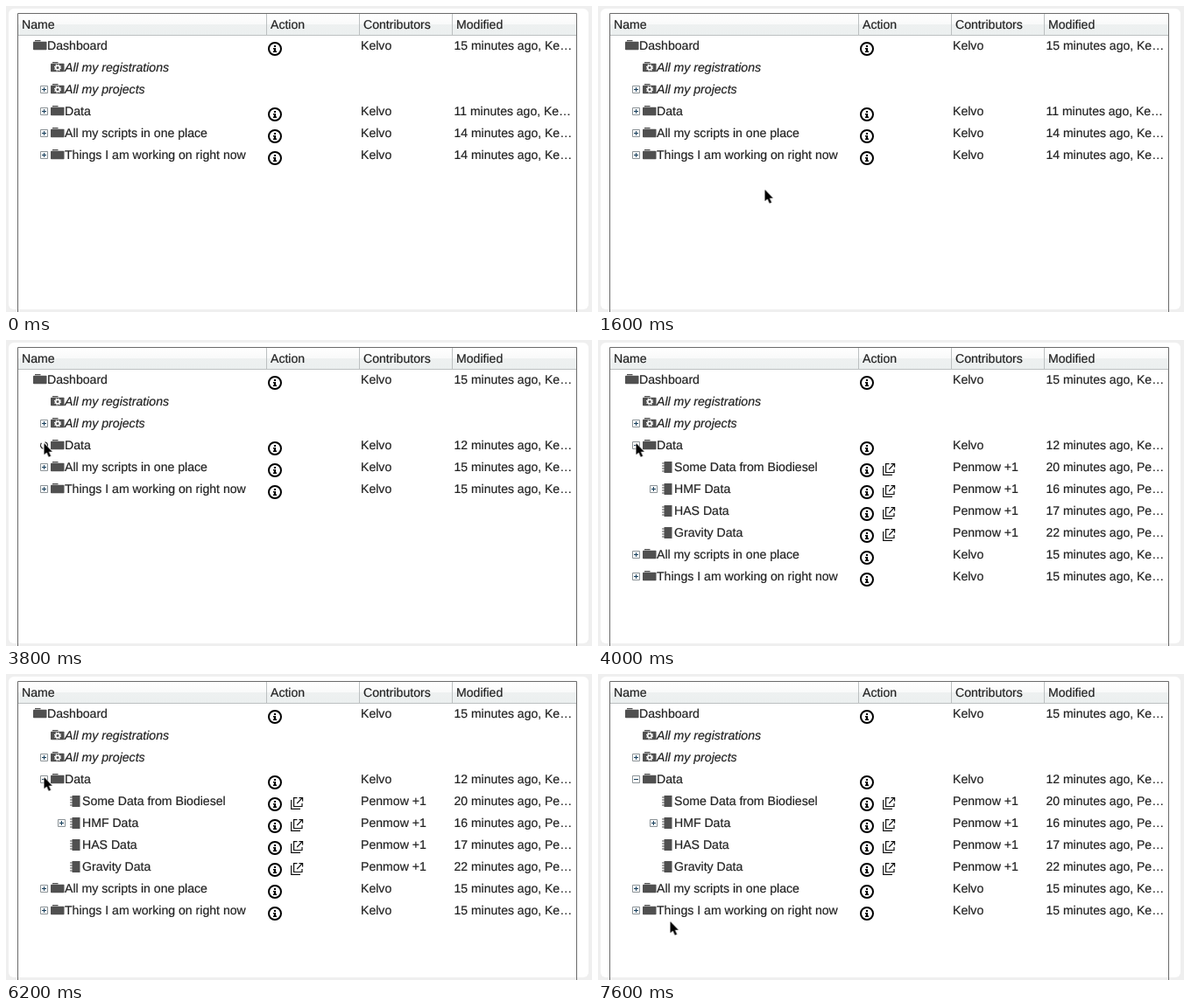
An HTML page for the animation above (8000 ms loop, 669 px wide and 350 px high).

```html
<!DOCTYPE html>
<html lang="en">
<head>
<meta charset="utf-8">
<title>Project organizer</title>
<style>
  html, body { margin: 0; width: 100%; height: 100%; overflow: hidden; background: #efefef; }
  svg { display: block; width: 100%; height: 100%; }
  text {
    font: 14.1px "Liberation Sans", Arial, sans-serif;
    fill: #222; stroke: #222; stroke-width: .2px;
    text-rendering: geometricPrecision;
  }
  .smart { font-style: italic; }
  .time { font-size: 14px; }

  /* 200 ms = 2.5 % */
  .old, .new, .plus, .wait, .minus, .kids, .tail, #cursor { animation: 8s step-end infinite; }
  .old, .plus { animation-name: until-click; }
  .new { animation-name: from-click; }
  .wait { animation-name: loading; }
  .minus, .kids { animation-name: loaded; }
  .tail { animation-name: push; }
  #cursor { animation-name: point; }
  .ring { animation: turn .8s steps(4) infinite; transform-origin: 43.5px 120.5px; }

  @keyframes until-click { 0% { opacity: 1 } 40%, 100% { opacity: 0 } }
  @keyframes from-click { 0% { opacity: 0 } 40%, 100% { opacity: 1 } }
  @keyframes loading { 0% { opacity: 0 } 40% { opacity: 1 } 50%, 100% { opacity: 0 } }
  @keyframes loaded { 0% { opacity: 0 } 50%, 100% { opacity: 1 } }
  @keyframes push { 0% { transform: none } 50%, 100% { transform: translateY(100px) } }
  @keyframes turn { to { transform: rotate(360deg) } }
  @keyframes point {
    0% { transform: translate(700px, 230px) }
    2.5% { transform: translate(640px, 240px) }
    5% { transform: translate(520px, 252px) }
    7.5% { transform: translate(450px, 255px) }
    12.5% { transform: translate(425px, 253px) }
    15% { transform: translate(360px, 244px) }
    17.5% { transform: translate(270px, 228px) }
    20% { transform: translate(190.5px, 210px) }
    22.5% { transform: translate(110px, 182px) }
    25% { transform: translate(59px, 160px) }
    27.5% { transform: translate(50px, 138px) }
    30% { transform: translate(45px, 121px) }
    32.5% { transform: translate(43.5px, 118px) }
    80% { transform: translate(46px, 125px) }
    82.5% { transform: translate(53px, 160px) }
    85% { transform: translate(62px, 210px) }
    87.5% { transform: translate(71px, 255px) }
    90% { transform: translate(76px, 279px) }
    92.5% { transform: translate(79px, 281px) }
    95%, 100% { transform: translate(82.5px, 283px) }
  }
</style>
</head>
<body>
<svg viewBox="0 0 669 350">
  <defs>
    <linearGradient id="head" x2="0" y2="1">
      <stop offset="0" stop-color="#fff"/>
      <stop offset=".48" stop-color="#f9fafa"/>
      <stop offset=".5" stop-color="#eef1f1"/>
      <stop offset="1" stop-color="#ebefef"/>
    </linearGradient>
    <g id="folder" fill="#505050">
      <path d="M2-6h6.5v1.3H2z"/>
      <rect y="-4.2" width="15.5" height="9.4" rx=".8"/>
    </g>
    <g id="cog">
      <use href="#folder"/>
      <g fill="none" stroke="#fff">
        <circle cx="8" cy=".5" r="2.3" stroke-width="1.6"/>
        <circle cx="8" cy=".5" r="3.5" stroke-width="1.2" stroke-dasharray="1.37"/>
      </g>
    </g>
    <g id="book">
      <path d="M2.5-6h9V7h-9z" fill="#505050"/>
      <path d="M0-4h3.5M0-1h3.5M0 2h3.5M0 5h3.5" stroke="#505050" stroke-width="1.2"/>
    </g>
    <g id="box" fill="none">
      <path d="M.5-3.5h8v8h-8z" fill="#fff" stroke="#8b9296"/>
      <path d="M2 .5h5" stroke="#173f5c"/>
    </g>
    <g id="boxplus">
      <use href="#box"/>
      <path d="M4.5-2v5" stroke="#173f5c"/>
    </g>
    <g id="info">
      <circle r="7" fill="#fff" stroke="#000" stroke-width="2"/>
      <path d="M-1.1-4h2.2v2h-2.2zM-2-1h3.1v3.6h1V4h-4.2V2.6h1V.4H-2z"/>
    </g>
    <g id="open" fill="none" stroke="#111" stroke-width="1.2">
      <path d="M.7-2V8.4H11"/>
      <path d="M7.5-4.3H3.6V5.5H13V2"/>
      <path d="M7.2 2L13.4-4.3M9.5-4.4H13.6V-.4"/>
    </g>
  </defs>

  <rect x="3" y="3" width="662" height="344" rx="6" fill="#fff"/>
  <path d="M14 9h637v24H14z" fill="url(#head)"/>
  <path d="M14 33.5h637M297.5 9v24M403.5 9v24M509.5 9v24" stroke="#bcc0c1"/>
  <path d="M13.5 350V8.5h638V350" fill="none" stroke="#6a6a6a"/>
  <g id="titles"></g>
  <g id="rows"></g>
  <g class="wait">
    <path class="ring" d="M39.7 119.5a4 4 0 0 1 6.5-2M47.3 121.5a4 4 0 0 1-6.5 2" fill="none" stroke="#333" stroke-width="1.2"/>
  </g>
  <path id="cursor" d="M0 0V13.2L3 10.5L5.3 15.8L7.6 14.8L5.4 9.7H9.3Z" stroke="#fff" paint-order="stroke"/>
</svg>
<script>
  const PITCH = 25;
  const put = (id, x, y, cls = '') => `<use href="#${id}" x="${x}" y="${y}" class="${cls}"/>`;
  const text = (s, x, y, cls = '') => `<text x="${x}" y="${y}" class="${cls}">${s}</text>`;
  const ago = (min, who, y, cls = '') => text(`${min} minutes ago, ${who}…`, 511.5, y, 'time ' + cls);

  // One table line centred on y; a "live" toggle opens during the loop
  function row(r, y) {
    const x = 31 + r.indent * 20;
    let out = put(r.icon, r.icon === 'book' ? x + 2 : x, y);
    out += text(r.name, x + 16, y + 5, r.icon === 'cog' ? 'smart' : '');
    if (r.toggle) out += put('boxplus', x - 12, y, r.toggle === 'live' ? 'plus' : '');
    if (r.toggle === 'live') out += put('box', x - 12, y, 'minus');
    if (!r.owner) return out;

    const who = r.owner.slice(0, 2);
    out += put('info', 307, y + 4) + text(r.owner, 405, y + 5);
    if (r.icon === 'book') out += put('open', 325, y + 1);
    return out + (r.later
      ? ago(r.min, who, y + 5, 'old') + ago(r.later, who, y + 5, 'new')
      : ago(r.min, who, y + 5));
  }

  const folder = (name, indent, min, later, toggle) =>
    ({ name, indent, icon: 'folder', toggle, owner: 'Kelvo', min, later });
  const smart = (name, toggle) => ({ name, indent: 1, icon: 'cog', toggle });
  const book = (name, min, toggle) =>
    ({ name, indent: 2, icon: 'book', toggle, owner: 'Penmow +1', min });

  const group = (cls, first, list) =>
    `<g class="${cls}">${list.map((r, i) => row(r, 45 + (first + i) * PITCH)).join('')}</g>`;

  document.getElementById('titles').innerHTML =
    ['Name', 'Action', 'Contributors', 'Modified']
      .map((s, i) => text(s, i ? 196 + i * 106 : 18, 26)).join('');

  document.getElementById('rows').innerHTML =
    group('', 0, [
      folder('Dashboard', 0, 15),
      smart('All my registrations'),
      smart('All my projects', 'plus'),
      folder('Data', 1, 11, 12, 'live')
    ]) +
    group('kids', 4, [
      book('Some Data from Biodiesel', 20),
      book('HMF Data', 16, 'plus'),
      book('HAS Data', 17),
      book('Gravity Data', 22)
    ]) +
    group('tail', 4, [
      folder('All my scripts in one place', 1, 14, 15, 'plus'),
      folder('Things I am working on right now', 1, 14, 15, 'plus')
    ]);
</script>
</body>
</html>
```
